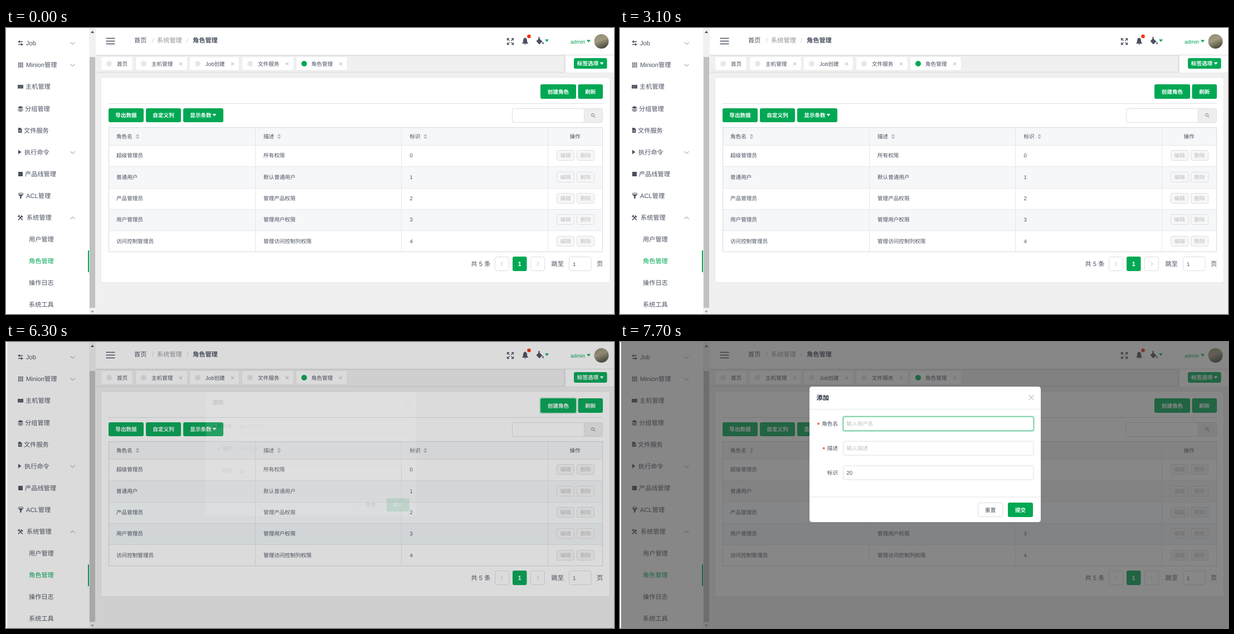
Animation, 1091 px wide and 513 px high, one loop 8000 ms. Source, as an HTML page:

```html
<!DOCTYPE html>
<html>
<head>
<meta charset="utf-8">
<style>
html, body { margin: 0; width: 100%; height: 100%; overflow: hidden; background: #fff; }
svg { display: block; width: 100%; height: 100%; }
text { font-family: "Liberation Sans", "Noto Sans CJK SC", "Noto Sans CJK", sans-serif; text-rendering: geometricPrecision; white-space: pre; }
</style>
</head>
<body>
<svg id="stage" viewBox="0 0 1091 513"></svg>
<script>
const GREEN = '#00a854', INK = '#495060', LINE = '#dddee1', PALE = '#bbbec4';
const SMALL = 9.6, BIG = 11.2;

const rect = (x, y, w, h, fill, more = '') =>
  `<rect x="${x}" y="${y}" width="${w}" height="${h}" fill="${fill}" ${more}/>`;
const box = (x, y, w, h, fill, stroke = LINE, more = '') =>
  rect(x + .5, y + .5, w - 1, h - 1, fill, `rx="3" stroke="${stroke}" ${more}`);
// y is the middle of the line of text
const text = (x, y, s, size = SMALL, fill = INK, more = '') =>
  `<text x="${x}" y="${y + size * .37}" font-size="${size}" fill="${fill}" ${more}>${s}</text>`;
const shape = (d, fill = INK) => `<path d="${d}" fill="${fill}"/>`;
const line = (d, stroke = INK, w = 1, more = '') =>
  `<path d="${d}" fill="none" stroke="${stroke}" stroke-width="${w}" ${more}/>`;
const circle = (x, y, r, fill) => `<circle cx="${x}" cy="${y}" r="${r}" fill="${fill}"/>`;
const cross = (x, y, r, w = 1) =>
  line(`M${x - r} ${y - r}l${2 * r} ${2 * r}m0 ${-2 * r}l${-2 * r} ${2 * r}`, '#999', w);
const caret = (x, y, fill) => shape(`M${x} ${y}h7l-3.5 4.5z`, fill);
const MID = 'text-anchor="middle"', BOLD = 'font-weight="bold"';
const button = (x, y, w, h, s, id = '', tx = x + w / 2) =>
  rect(x, y, w, h, GREEN, `rx="3" ${id && `id="${id}"`}`) +
  text(tx, y + h / 2, s, SMALL, '#fff', `${MID} ${BOLD}`);

function sidebar() {
  const items = [[36, 'Job', 1], [36, 'Minion管理', 1], [35, '主机管理'], [34, '分组管理'], [32, '文件服务'],
    [33, '执行命令', 1], [34, '产品线管理'], [36, 'ACL管理'], [37, '系统管理', -1]];
  let s = rect(0, 0, 149, 513, '#fff') + rect(149, 0, 12, 513, '#f1f1f1') + rect(150, 52, 10, 450, '#c1c1c1') +
    shape('M152 9l3-4 3 4z', '#505050') + shape('M152 507l3 4 3-4z', '#a3a3a3');
  items.forEach(([x, label, fold], i) => {
    const y = 27 + i * 39.15;
    s += text(x, y, label, BIG);
    if (fold) s += line(`M115.5 ${y - 2 * fold + .5}l4 ${4 * fold} 4 ${-4 * fold}`, '#7d838e');
  });
  ['用户管理', '角色管理', '操作日志', '系统工具'].forEach((label, i) =>
    s += text(41, 379 + i * 39.1, label, BIG, i == 1 ? GREEN : INK));
  s += rect(147, 399, 2, 39, GREEN);

  s += line('M23 24.5h7M22 29.5h7', INK, 1.3) + shape('M25 22v5l-4-2.5zM27 27v5l4-2.5z');
  for (let i = 0; i < 9; i++) s += rect(22 + i % 3 * 3.2, 62 + (i / 3 | 0) * 3.2, 2.2, 2.2, INK);
  s += rect(21, 102, 10, 6.5, INK) + line('M22 104h8M22 106.3h8', '#aaa', .8, 'stroke-dasharray="1 1"');
  s += shape('M26 140l5 2.5-5 2.5-5-2.5z') + line('M21.5 145l4.5 2 4.5-2M21.5 147.5l4.5 2 4.5-2', INK, 1.2);
  s += shape('M22 179h4l2.5 2.5v6.5h-6.5z') + line('M23.5 183.5h3.5M23.5 185.8h3.5', '#fff', .8);
  s += shape('M22 218.5l5.5 4-5.5 4z') + rect(22, 258, 8, 8, INK);
  s += shape('M21.5 298l3.7 4v4.500l2.600-1.500v-3l3.700-4z') +
    '<ellipse cx="26.500" cy="297.500" rx="4.600" ry="1.500" fill="#fff" stroke="#495060"/>';
  s += line('M22 344.500l6-6.500M23.500 338l6.500 6.500', INK, 1.7) + line('M21.500 338.500l3-2.500M27 336.500l3 3', INK, 2);
  return s;
}

function header() {
  let s = rect(161, 0, 930, 48, '#fff') + rect(161, 48, 930, 1.5, '#dcdcdc') +
    line('M179.500 18.500h16M179.500 23.500h16M179.500 28.500h16', INK, 1.3);
  s += text(230, 22, '首页', BIG) + text(262, 22, '/', BIG, '#ccc') + text(271, 22, '系统管理', BIG, '#8d929b') +
    text(324, 22, '/', BIG, '#ccc') + text(335, 22, '角色管理', BIG, INK, BOLD);
  s += line('M903 19h-3.500v3.500M907 19h3.500v3.500M903 29.500h-3.500v-3.500M907 29.500h3.500v-3.500' +
    'M900 19.500l3.500 3.500M910 19.500l-3.500 3.500M900 29l3.500-3.500M910 29l-3.500-3.500', INK, 1.3);
  s += shape('M926 28q2-2 2-5q0-5 3.500-5.500q3.500 .5 3.500 5.500q0 3 2.500 5zM930 28.700h3.500q-1.700 2.600-3.500 0z') +
    circle(938.5, 15, 3.3, '#f5310a');
  s += shape('M951.500 23.500l5-5 6 5.500-5.500 5.500zM963.500 24.500q2.700 4 0 4.600q-2.500-.6 0-4.600z') +
    line('M957.500 21v-4.500h-2v3', INK, 1) + caret(967, 20.5, GREEN);
  s += text(1013, 24, 'admin', SMALL, GREEN) + caret(1042, 21.5, GREEN) + circle(1068.5, 24, 13, 'url(#photo)');

  const tabs = [[170, 58, '首页', 199], [232, 94, '主机管理', 261], [329, 90, 'Job创建', 358],
    [423, 94, '文件服务', 452], [520, 93, '角色管理', 548]];
  s += rect(161, 78.5, 930, 2, '#e2e2e2');
  tabs.forEach(([x, w, label, tx], i) => {
    s += box(x, 51, w, 25.5, '#fff', '#e9eaec') + circle(x + 15, 64, 5, i == 4 ? GREEN : '#e6e8ea') + text(tx, 64, label);
    if (i) s += cross(x + w - 12.5, 64.3, 2.5, .9);
  });
  s += rect(1001, 49, 3, 31, '#e3e3e3') + rect(1004, 49, 87, 31, '#fff') +
    button(1019, 54, 59.5, 19, '标签选项', '', 1044) + caret(1065.5, 61.5, '#fff');
  return s;
}

function card() {
  let s = box(170, 88, 914, 369, '#fff', '#e6e6e6');
  s += rect(957, 99, 68, 30, GREEN, 'id="ring" rx="4" opacity=".2"') +
    button(959, 101, 64, 26, '创建角色', 'create') + button(1026.5, 101, 44.5, 26, '刷新');
  s += rect(184, 135, 887, 1, LINE);
  s += button(184, 144, 63, 25, '导出数据') + button(251, 144, 63, 25, '自定义列') +
    button(318, 144, 72, 25, '显示条数', '', 349.5) + caret(370.5, 154, '#fff');
  s += box(908, 144, 163, 26, '#eee') + box(908, 144, 130, 26, '#fff', LINE, 'id="search"') +
    '<circle cx="1053" cy="156" r="2.500" fill="none" stroke="#777" stroke-width=".9"/>' + line('M1055 158l2.500 2.500', '#777');

  s += rect(184, 178, 887, 32, '#f5f7f9');
  const rows = [['超级管理员', '所有权限'], ['普通用户', '默认普通用户'], ['产品管理员', '管理产品权限'],
    ['用户管理员', '管理用户权限'], ['访问控制管理员', '管理访问控制列权限']];
  const cols = [198, 462, 724.5];
  rows.forEach((row, i) => {
    const top = 210 + i * 38.3, y = top + 18.8;
    s += rect(184, top, 887, 38.3, '#fff', `id="row${i}"`) + rect(184, Math.round(top), 887, 1, '#e4e6ea');
    [...row, i].forEach((cell, c) => s += text(cols[c], y, cell));
    ['编辑', '删除'].forEach((label, b) =>
      s += box(988 + b * 36, Math.round(y - 9.5), 32, 19, '#f7f7f7') + text(1004 + b * 36, y, label, SMALL, PALE, MID));
  });
  ['角色名', '描述', '标识'].forEach((label, c) => {
    const x = cols[c] + [38, 28, 28][c];
    s += text(cols[c], 194.5, label, SMALL, INK, 'font-weight="500"') +
      shape(`M${x - 3.5} 193.800l3.500-4 3.500 4zM${x - 3.5} 195.200l3.500 4 3.500-4z`, PALE);
  });
  s += text(1021, 194.5, '操作', SMALL, INK, `${MID} font-weight="500"`);
  for (const x of [447, 709, 972]) s += rect(x, 178, 1, 224, '#e4e6ea');
  s += line('M184 178.500h887M184 401.500h887M184.500 178v224M1070.500 178v224', '#d7dae0');

  s += text(834.5, 423, '共 5 条', BIG) + box(877, 410, 26, 26, '#fff') + box(941, 410, 26, 26, '#fff') +
    line('M891.500 419.500l-3.500 3.500 3.500 3.500M952.500 419.500l3.500 3.500-3.500 3.500', PALE) +
    rect(909, 410, 25.5, 26, GREEN, 'rx="3"') + text(921.7, 423, '1', BIG, '#fff', `${MID} ${BOLD}`) +
    text(978.5, 422.5, '跳至', BIG) + box(1010, 410, 40.5, 26, '#fff') + text(1017, 423, '1') + text(1060, 422.5, '页', BIG);
  return s;
}

function dialog() {
  let s = rect(340, 80, 415, 243, '#fff', 'rx="4.500"') +
    text(352.5, 99.5, '添加', BIG, '#1c2438', BOLD) + cross(738, 99.5, 4.5) +
    rect(340, 120, 415, 1, '#e3e4e7') + rect(340, 277.5, 415, 1, '#e3e4e7');
  s += rect(398.5, 132, 345.5, 29.5, GREEN, 'id="glow" rx="4" opacity=".2"');
  [['角色名', '输入用户名', 354], ['描述', '输入描述', 363.5], ['标识', '20']].forEach(([label, value, star], i) => {
    const y = 146.5 + i * 44;
    s += box(400, y - 13, 342.5, 26, '#fff', LINE, i ? '' : 'id="field"') +
      text(391, y - .5, label, SMALL, INK, 'text-anchor="end"') +
      text(406.5, y + .3, value, SMALL, star ? PALE : INK);
    if (star) s += text(star, y + 1.5, '*', 11, '#ed3f14', BOLD);
  });
  s += rect(407, 141, 1, 11, '#333', 'id="cursor"');
  s += box(642, 288, 45.5, 26, '#fff') + text(664.7, 301, '重置', SMALL, INK, MID) + button(696, 288, 45, 26, '提交');
  return s;
}

stage.innerHTML = `<defs><linearGradient id="photo" x2=".4" y2="1">
  <stop offset="0" stop-color="#8d8c72"/><stop offset=".5" stop-color="#a39a80"/><stop offset="1" stop-color="#4f5240"/>
  </linearGradient></defs>` + rect(0, 0, 1091, 513, '#f0f0f0') + sidebar() + header() + card() +
  rect(2, 0, 1089, 513, '#373737', 'id="mask"') + `<g id="modal">${dialog()}</g>`;

const $ = id => document.getElementById(id);
const set = (id, name, value) => $(id).setAttribute(name, value);
const show = (id, on) => set(id, 'visibility', on ? 'visible' : 'hidden');
const easeInOut = p => p < .5 ? 4 * p ** 3 : 1 - 4 * (1 - p) ** 3;

function draw(now) {
  // the screen refreshes ten times a second
  const t = Math.floor(now % 8000 / 100) * 100;
  const during = (a, b) => t >= a && t < b;

  const fills = ['#fff', '#f5f7f9', '#fff', '#f5f7f9', '#fff'];
  if (during(1200, 2400)) fills[0] = '#f0f9ff';
  if (during(2400, 3100) || during(4400, 5300)) fills[2] = '#ebf7ff';
  if (t >= 5300) { fills[2] = '#fafdff'; fills[3] = '#f3f7fa'; }
  fills.forEach((fill, i) => set('row' + i, 'fill', fill));

  set('search', 'stroke', during(5600, 5700) ? '#33b976' : LINE);
  set('create', 'fill', during(5800, 6100) ? '#33b976' : during(6100, 6300) ? '#00a050' : GREEN);
  show('ring', during(6100, 7300));

  const p = t < 6300 ? 0 : Math.min(1, (t - 6210) / 300), e = easeInOut(p), k = .9 + .1 * e;
  set('mask', 'opacity', .6 * p);
  set('modal', 'opacity', e);
  set('modal', 'transform', `translate(547.5 201.5) scale(${k}) translate(-547.5 -201.5)`);

  const focus = Math.max(0, Math.min(1, (t - 7200) / 200));
  set('glow', 'opacity', .2 * focus);
  set('field', 'stroke', focus == 1 ? '#33b976' : focus ? '#88cbab' : LINE);
  $('cursor').style.display = during(7300, 7700) ? '' : 'none';
}

const start = performance.now();
(function tick() {
  draw(performance.now() - start);
  requestAnimationFrame(tick);
})();
</script>
</body>
</html>
```
